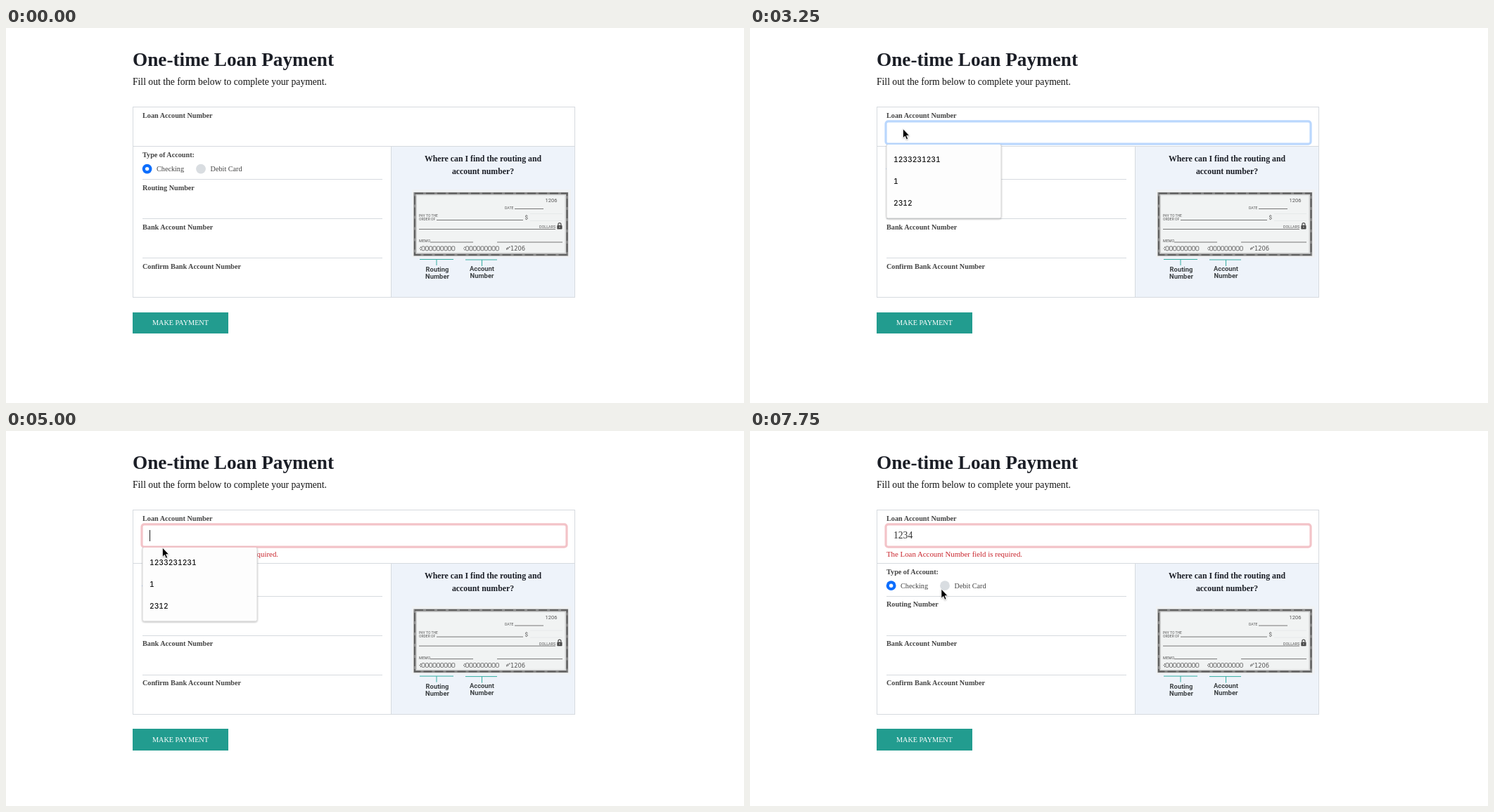
An HTML page for the animation above (8000 ms loop, 1049 by 534 pixels).

```html
<!DOCTYPE html>
<html lang="en">
<head>
<meta charset="utf-8">
<title>Loan payment form</title>
<style>
  html, body { margin: 0; width: 100%; height: 100%; overflow: hidden; background: #fff; }
  svg { display: block; width: 1049px; height: 534px; font-family: "Liberation Serif", serif; font-size: 10.2px; }
  .label { font-weight: bold; fill: #444; }
  .option { fill: #444; }
  .heading { font-size: 11.8px; font-weight: bold; fill: #1b1e26; text-anchor: middle; }
  .rules { fill: none; stroke: #d6dadf; shape-rendering: crispEdges; }
  .check { font-family: Roboto, sans-serif; fill: #555; font-size: 5.5px; }
  .caption { font-family: Roboto, sans-serif; font-size: 9.4px; font-weight: bold; fill: #3c4043; text-anchor: middle; }
  .menu { font-family: Inter, sans-serif; font-size: 10.3px; font-weight: 500; font-variant-numeric: tabular-nums; fill: #111; }
</style>
</head>
<body>
<svg viewBox="0 0 1049 534">
  <defs>
    <filter id="soft" x="-20%" y="-20%" width="140%" height="150%">
      <feDropShadow dx="0" dy="1" stdDeviation="1.2" flood-opacity=".3"/>
    </filter>
    <g id="zeros"></g>
  </defs>

  <text x="180" y="54" font-size="27.25" font-weight="bold" fill="#1b1e26">One-time Loan Payment</text>
  <text x="180" y="80.6" font-size="13.63" fill="#111">Fill out the form below to complete your payment.</text>
  <rect id="frame" class="rules" x="180.5" y="112.5" width="628"/>
  <text class="label" x="194" y="127.6">Loan Account Number</text>
  <text id="error" x="194" y="179.4" font-size="10.85" fill="#c9252d">The Loan Account Number field is required.</text>

  <g id="lower">
    <rect x="548" y="169" width="260" height="214" fill="#eef3fa" shape-rendering="crispEdges"/>
    <path class="rules" d="M181 168.5H808M547.5 169V383M194 215.5H535M194 271.5H535M194 327.5H535"/>
    <text class="label" x="194" y="184">Type of Account:</text>
    <circle id="radioRing" cx="200.6" cy="200.6" r="8" fill="none" stroke="#b9d5fd" stroke-width="2.6"/>
    <circle cx="200.6" cy="200.6" r="6.9" fill="#0d6efd"/>
    <circle cx="200.6" cy="200.6" r="2.7" fill="#fff"/>
    <circle cx="277" cy="200.6" r="6.9" fill="#d9dde1"/>
    <text class="option" x="214" y="204">Checking</text>
    <text class="option" x="290.6" y="204">Debit Card</text>
    <text class="label" x="194" y="230.6">Routing Number</text>
    <text class="label" x="194" y="286.6">Bank Account Number</text>
    <text class="label" x="194" y="342.6">Confirm Bank Account Number</text>

    <text class="heading" x="678" y="190.4">Where can I find the routing and</text>
    <text class="heading" x="678" y="208.4">account number?</text>

    <g class="check">
      <rect x="577" y="230" width="226" height="97" fill="#f0f2f4"/>
      <rect x="581" y="235.5" width="216.5" height="87.5" fill="#f1f3f3" stroke="#8a8a8a" stroke-width="3.2"/>
      <rect x="581" y="235.5" width="216.5" height="87.5" fill="none" stroke="#606060" stroke-width="2" stroke-dasharray="12 4"/>
      <rect x="583.5" y="238" width="211.5" height="82.5" fill="none" stroke="#b5b5b5" stroke-width=".6"/>
      <path d="M723 257.5H764M612 273.5H735M587 286.5H781M603 305H664M698 305H791" stroke="#777" fill="none"/>
      <path d="M745 264.5H791M745 274.5H791" stroke="#e6e9ea" fill="none"/>
      <text x="766.6" y="248.2" font-size="7.5">1206</text>
      <text x="709" y="257.6" font-size="5.2">DATE</text>
      <text x="587" y="269" font-size="5">PAY TO THE</text>
      <text x="587" y="274" font-size="5">ORDER OF</text>
      <text x="737.5" y="272" font-size="8">$</text>
      <text x="758" y="285.4" font-size="5.4">DOLLARS</text>
      <text x="587" y="305.4" font-size="5.4">MEMO</text>
      <rect x="783.3" y="281" width="7.2" height="5.6" rx=".8" fill="#4a4a4a"/>
      <path d="M784.9 281V279.6a2 2 0 0 1 4 0V281" fill="none" stroke="#4a4a4a" stroke-width="1.2"/>
      <circle cx="786.9" cy="283.6" r=".8" fill="#ddd"/>
      <use href="#zeros" x="591"/>
      <use href="#zeros" x="653.6"/>
      <path d="M587.5 314h1.2M589.5 311.5v1.6M589.5 315v1.6M650 314h1.2M652 311.5v1.6M652 315v1.6M711.8 313v3M713.6 312v3M715.8 311v2" stroke="#666" stroke-width="1.2"/>
      <text x="717" y="317" font-family="DejaVu Sans, sans-serif" font-size="8.3">1206</text>
    </g>
    <path d="M588 329.5H636M612 329.5V338M653 330H698M676.5 330V339" stroke="#35ada1" fill="none"/>
    <text class="caption" x="613" y="347">Routing</text>
    <text class="caption" x="613" y="357">Number</text>
    <text class="caption" x="676.5" y="346">Account</text>
    <text class="caption" x="676.5" y="356">Number</text>

    <rect x="180" y="404.7" width="136" height="30.6" fill="#229c8f" shape-rendering="crispEdges"/>
    <text x="248" y="423.4" fill="#fff" text-anchor="middle">MAKE PAYMENT</text>
  </g>

  <rect id="field" x="193" y="132.8" width="604" height="32.4" rx="3.5" fill="#fff"/>
  <text id="typed" x="204" y="153.2" font-size="13.6" fill="#333"></text>
  <path id="caret" stroke="#222" d="M0 141V157" shape-rendering="crispEdges"/>

  <g id="menu" class="menu">
    <rect id="menuBox" x="194" y="165.5" width="163" rx="2.5" fill="#fdfdfd" stroke="#cfcfcf" stroke-width=".8" filter="url(#soft)"/>
    <path id="menuTop" d="M195 165.5H356"/>
    <text x="204" y="191.3">1233231231</text>
    <g id="moreItems">
      <text x="204" y="222">1</text>
      <text x="204" y="252.7">2312</text>
    </g>
  </g>

  <path id="pointer" d="M.4 0V13.2L3.4 10.5 5.4 15.2 7.6 14.2 5.6 9.7H9.6Z" fill="#000" stroke="#fff" stroke-width=".8" filter="url(#soft)"/>
</svg>
<script>
const LOOP = 8000, ERROR_SHIFT = 19.6;
const el = id => document.getElementById(id);
const set = (id, attrs) => { for (const k in attrs) el(id).setAttribute(k, attrs[k]); };
const show = (id, on) => set(id, { visibility: on ? "inherit" : "hidden" });

// Each track lists [start time, value]; the value holds until the next entry.
const tracks = {
  pointer: [[0, null], [1500, [201, 163]], [1750, [217, 143.5]], [4500, [222, 166]],
            [7250, [233, 209]], [7500, [254, 244]], [7750, [271.5, 225]]],
  focus: [[0, 0], [2750, .5], [3000, 1], [3750, 0], [4750, .5], [5000, 1]],
  menuRows: [[0, 0], [2750, 3], [3750, 0], [4750, 3], [5500, 1], [5750, 0]],
  typed: [[0, ""], [5500, "123"], [5750, "1234"]],
  caret: [[0, false], [2750, true], [3250, false], [4750, true], [5250, false],
          [5500, true], [6250, false], [6750, true], [7500, false]],
  error: [[0, false], [3750, true]],
  radioRing: [[0, false], [3750, true], [4750, false]]
};
const at = (name, t) => tracks[name].findLast(([start]) => start <= t)[1];

for (let i = 0; i < 9; i++)
  el("zeros").innerHTML += `<rect x="${i * 5.35}" y="311" width="4" height="5.8" rx="1.1" fill="none" stroke="#666" stroke-width=".9"/>`;

function draw(t) {
  const error = at("error", t), focus = at("focus", t), rows = at("menuRows", t);
  const typed = at("typed", t), pointer = at("pointer", t);
  const ring = error ? "#f3c3c8" : "#bad7fd";

  set("lower", { transform: `translate(0 ${error ? ERROR_SHIFT : 0})` });
  set("frame", { height: 271 + (error ? 20 : 0) });
  show("error", error);
  show("radioRing", at("radioRing", t));

  show("field", focus > 0);
  set("field", { stroke: ring, "stroke-width": 1 + 2.2 * focus, "stroke-opacity": .4 + .6 * focus });
  el("typed").textContent = typed;
  show("caret", at("caret", t));
  set("caret", { transform: `translate(${204.5 + typed.length * 6.8} 0)` });

  show("menu", rows > 0);
  show("moreItems", rows > 1);
  set("menuBox", { height: 44 + 30.7 * Math.max(0, rows - 1) });
  set("menuTop", { stroke: ring });

  show("pointer", pointer);
  if (pointer) set("pointer", { transform: `translate(${pointer})` });
}

function tick() {
  draw(performance.now() % LOOP);
  requestAnimationFrame(tick);
}
tick();
</script>
</body>
</html>
```
